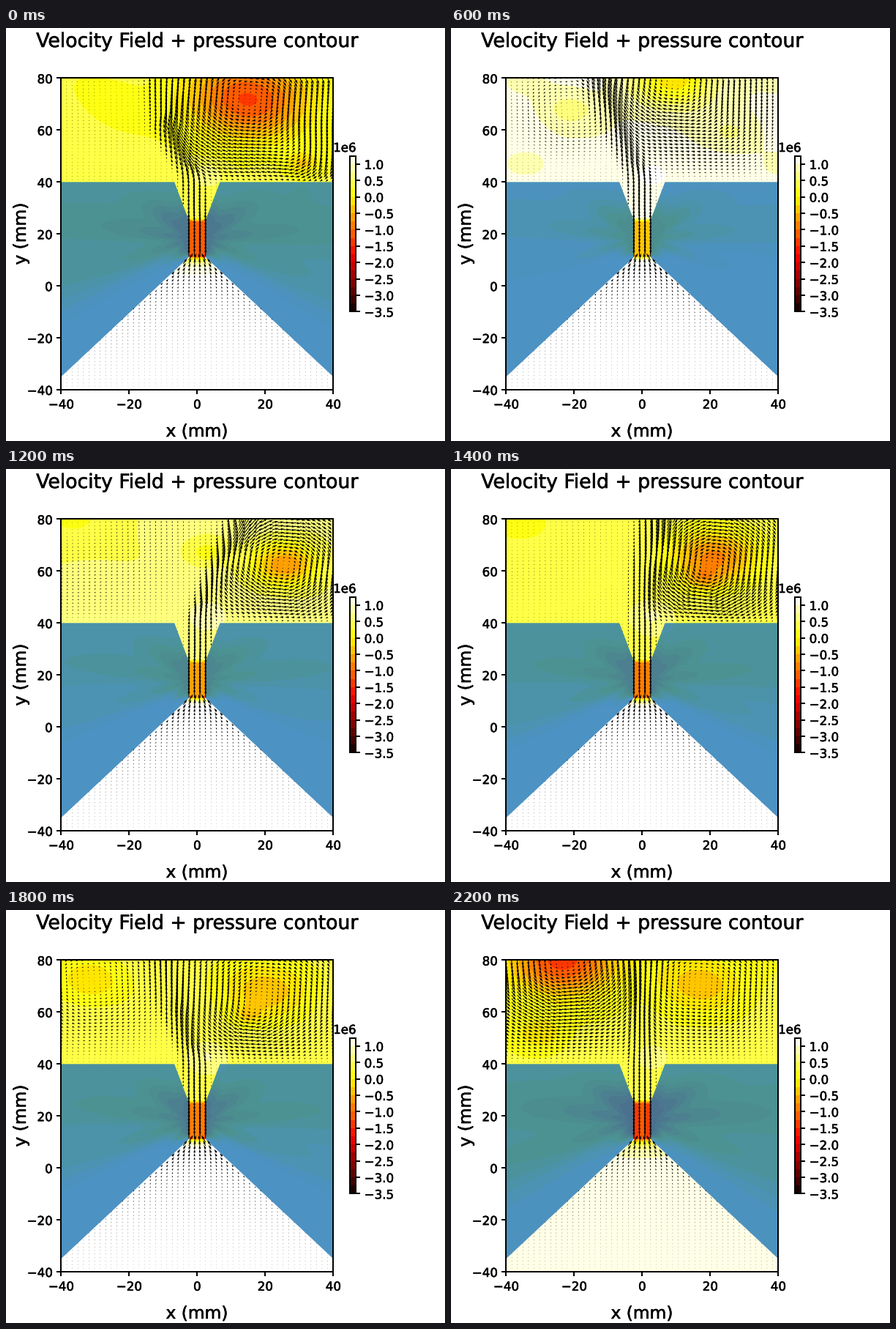
These frames come from a looping animation (600 by 564 pixels, 2400 ms). A matplotlib script:

```python
import numpy as np
import matplotlib as mpl
import matplotlib.pyplot as plt
from matplotlib import patheffects
from matplotlib.animation import ArtistAnimation

W, H, DPI = 600, 564, 120
FRAMES, STEP = 12, 200
LEVELS = np.arange(-3.5, 1.3, 0.25)
NORM = mpl.colors.Normalize(-3.5, 1.25)
BOLDER = [patheffects.withStroke(linewidth=0.35, foreground="black")]

plt.rcParams.update({
    "font.family": "DejaVu Sans", "font.size": 10,
    "axes.linewidth": 1.2, "xtick.major.width": 1.2, "ytick.major.width": 1.2,
})

# Wall profile: channel half width against height
WALL_Y = [-40, -35, 11, 25.5, 40]
WALL_X = [44.1, 40, 2.5, 2.5, 6.7]

# Columns: jet x at y=60 and y=80, pressure outside / throat / inlet,
# then x, y, depth, radius of right, secondary and left vortices
KEY_T = [0, 2, 4, 6, 8, 10, 11, 12]
KEYS = np.array([
    [-8.5, -9, .3, -1.0, 1.5, 15, 72, 1.6, 17, 31, 47, .6, 5, -24, 70, .2, 9],
    [-13, -25, .6, -.6, 2.2, 3, 82, 1.2, 16, 22, 56, .6, 8, -24, 62, -.3, 4],
    [0, 1, 1.45, .1, 2.6, 16, 76, 1.1, 8, 30, 62, 0, 6, -18.5, 74, 1.2, 10],
    [7, 14, .6, -.5, 2.0, 26, 62.5, 1.3, 10, 3, 67, .5, 6, -38, 82, .35, 22],
    [-4, -5.5, .25, -1.0, 1.6, 16, 68, 1.15, 16, 33, 46.5, .5, 4, -35, 75, .05, 10],
    [-7.5, -11, .55, -.7, 2.1, 24, 69, .5, 11, -3, 71, .4, 4, -27.5, 69, 1.1, 12],
    [-.5, 0, .3, -1.2, 1.2, 17, 71, .75, 12, -30, 52, .5, 7, -23, 80, 1.7, 15],
])
KEYS = np.vstack([KEYS, KEYS[:1]])


def half_width(y):
    return np.where(y > 40, 99, np.interp(y, WALL_Y, WALL_X))


def params(i):
    row = [np.interp(i, KEY_T, col) for col in KEYS.T]
    return row[:5], [row[k:k + 4] for k in (5, 9, 13)]


def outside(x, y, base, vortices):
    p = base + 0.4 * np.exp(-((x - 3) ** 2 + (y - 43) ** 2) / 30)
    p = p + 0.04 * np.sin(x / 6 + 1) * np.cos(y / 5)
    for cx, cy, depth, r in vortices:
        p = p - depth * np.exp(-((x - cx) ** 2 + ((y - cy) * 1.15) ** 2) / r ** 2)
    return p


def pressure(x, y, i):
    (_, _, base, throat, inlet), vortices = params(i)
    ax_ = np.abs(x)
    half = half_width(y)

    # Fluid: inlet, throat, open chamber
    core = throat - 0.25 * (ax_ / 2.5) ** 2
    r = 2.5 + 0.815 * np.hypot(x * 0.5, np.minimum(y - 11, 0))
    below = inlet - (inlet - throat) * (2.5 / r) ** 2
    above = outside(x, y, base, vortices)
    mix = np.clip((y - 24.8) / 1.5, 0, 1)
    fluid = np.where(y < 11, below, core * (1 - mix) + above * mix)
    fluid = fluid - 1.3 * np.exp(-((ax_ - 2.5) ** 2 + (y - 11) ** 2) / 0.8)

    # Behind the walls: blend of the three neighbouring boundaries
    d_top = np.maximum(40 - y, 0.3)
    d_low = np.maximum((ax_ - half) * 0.775, 0.3)
    d_low = np.where(y < 11, d_low, np.hypot(ax_ - 2.5, (y - 11)))
    d_low = np.maximum(np.where(y < 11, d_low, 0.63 * (y + 35 - (40 - ax_) * 1.227)), 0.3)
    d_thr = np.maximum(np.hypot(ax_ - 2.5, np.maximum(np.abs(y - 18) - 6, 0)), 0.3)
    fan = 1 + 0.35 * np.sin(9 * np.arctan2(y - 18, ax_ - 2.5) + 0.4 * np.sign(x))
    parts = [(d_top ** -2., outside(x, 40, base, vortices)),
             (d_low ** -2., inlet),
             (1.5 * fan * d_thr ** -2., throat)]
    solid = sum(w * v for w, v in parts) / sum(w for w, _ in parts)
    return np.where(ax_ > half, solid, fluid)


def velocity(x, y, i):
    (mid, top, *_), vortices = params(i)
    half = half_width(y)

    def axis(h):
        return np.interp(h, [25, 42, 60, 80], [0, 0.15 * mid, mid, top])

    # Inlet converges on the throat, then the jet follows its bent axis
    v_in = 2.5 / np.minimum(half, 50)
    u_in = -0.815 * x / half * v_in
    width = 2.6 + 0.03 * np.maximum(y - 25, 0)
    off = x - axis(y)
    speed = np.exp(-(off / width) ** 2 * np.where(y > 26, 0.8, 0.15))
    slope = (axis(y + 3) - axis(y - 3)) / 6
    length = np.hypot(slope, 1)
    u = np.where(y < 11, u_in, speed * slope / length)
    v = np.where(y < 11, v_in, speed / length)

    for (cx, cy, depth, r), spin in zip(vortices, (1, 1, -1)):
        dx, dy, size = x - cx, y - cy, r + 3
        q = np.hypot(dx, dy) / size
        side = 1 / (1 + np.exp(np.clip(-spin * off / 1.3, -50, 50)))
        g = 0.55 * min(max(depth, 0), 1.3) * np.exp(0.5 * (1 - q ** 2)) / size
        g = g * side * np.clip((y - 38) / 6, 0, 1) * spin
        u, v = u + g * dy, v - g * dx
    return u, v


def label(x, y, text, size, **kw):
    fig.text(x / W, 1 - y / H, text, size=size, va="baseline",
             path_effects=BOLDER, **kw)


def box(x0, y0, x1, y1):
    return fig.add_axes([x0 / W, 1 - y1 / H, (x1 - x0) / W, (y1 - y0) / H])


fig = plt.figure(figsize=(W / DPI, H / DPI), dpi=DPI, facecolor="white")
ax = box(75.3, 68.5, 447.3, 494)
ax.set(xlim=(-40, 40), ylim=(-40, 80),
       xticks=range(-40, 41, 20), yticks=range(-40, 81, 20))

cax = box(470.3, 174.5, 478, 387.3)
bar = fig.colorbar(mpl.cm.ScalarMappable(NORM, "hot"), cax=cax,
                   boundaries=LEVELS, ticks=np.arange(-3.5, 1.1, 0.5))
bar.outline.set_linewidth(1.2)
cax.minorticks_off()

for t in ax.get_xticklabels() + ax.get_yticklabels() + cax.get_yticklabels():
    t.set_path_effects(BOLDER)

label(261, 26, "Velocity Field + pressure contour", 16, ha="center")
label(261, 558, "x (mm)", 14, ha="center")
fig.text(27 / W, 1 - 281 / H, "y (mm)", size=14, rotation=90, ha="right",
         va="center", rotation_mode="default", path_effects=BOLDER).set(
    ha="center", va="baseline", rotation_mode="anchor")
label(478.5, 169, "1e6", 10, ha="right")

for side in (-1, 1):
    pts = [(40, -35), (2.5, 11), (2.5, 25.5), (6.7, 40), (40, 40)]
    ax.add_patch(plt.Polygon([(side * x, y) for x, y in pts], fc="tab:blue",
                             alpha=0.8, lw=0, zorder=1.5))

px, py = np.meshgrid(np.linspace(-40, 40, 241), np.linspace(-40, 80, 301))
qx, qy = np.meshgrid(np.linspace(-40, 40, 50), np.linspace(-40, 80, 90))
inside = np.abs(qx) <= half_width(qy)
qx, qy = qx[inside], qy[inside]

scenes = []
for i in range(FRAMES):
    fill = ax.contourf(px, py, pressure(px, py, i), LEVELS, cmap="hot",
                       norm=NORM, zorder=0)
    arrows = ax.quiver(qx, qy, *velocity(qx, qy, i), units="dots", width=1.05,
                       scale_units="dots", scale=1 / 13, minlength=0.7, zorder=2)
    scenes.append([fill, arrows])

anim = ArtistAnimation(fig, scenes, interval=STEP, repeat=True, repeat_delay=0)
plt.show()
```
